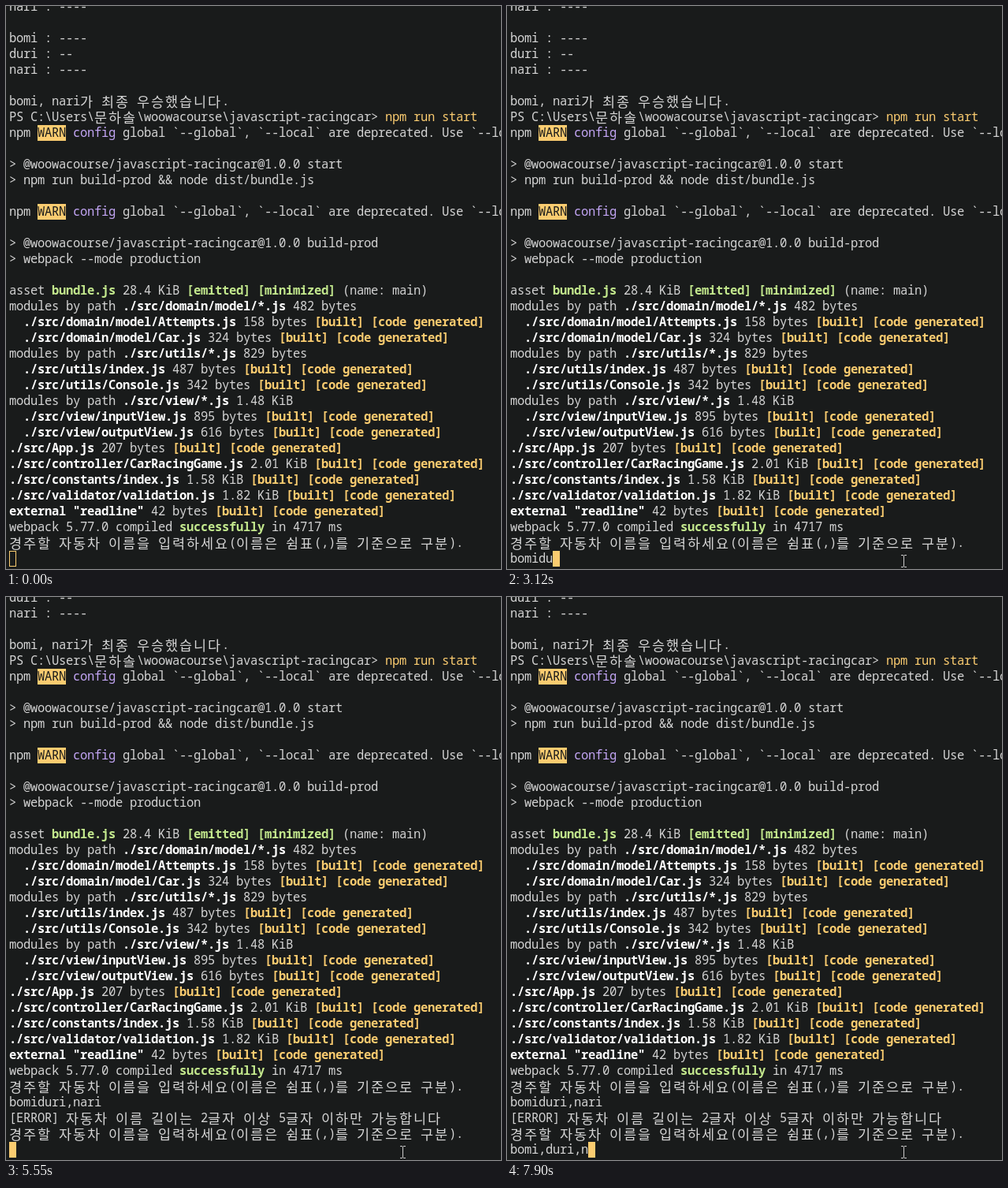
These frames come from a looping animation (628 px wide and 714 px high, 8000 ms). An HTML page with a canvas:

```html
<!DOCTYPE html>
<html lang="ko">
<head>
<meta charset="utf-8">
<title>Terminal</title>
<style>
html, body { margin: 0; width: 100%; height: 100%; overflow: hidden; background: #191b1b; }
canvas { display: block; }
</style>
</head>
<body>
<canvas id="stage" width="628" height="714"></canvas>
<script>
const ctx = document.getElementById('stage').getContext('2d');
const LOOP = 8000, CELL = 9, ROW = 20, LEFT = 4, TOP = -9, INPUT_ROW = 35;
const BG = '#191b1b', YELLOW = '#fbcc70';
const LATIN = '15.5px "Noto Sans Mono", "DejaVu Sans Mono", monospace';
const HANGUL = '300 17.5px "Noto Sans CJK KR", "Noto Sans CJK", sans-serif';

// Styles selected in the text with ^ and a letter
const styles = {
  d: { color: '#d4d4d4' },
  w: { color: '#ffffff', bold: true },
  g: { color: '#c3e88d', bold: true },
  y: { color: YELLOW, bold: true },
  n: { color: YELLOW },
  p: { color: '#c3a6f5' },
  x: { color: BG, back: YELLOW }
};

const [A, B, C] = ['bomi', 'duri', 'nari'];
const warn = 'npm ^xWARN^d ^pconfig^d global `--global`, `--local` are deprecated. Use `--location=global` instead.';
const built = '^y[built] [code generated]';
const file = (path, size) => `^w${path}^d ${size} ${built}`;
const group = (path, size) => `modules by path ^w${path}^d ${size}`;
const prompt = '경주할 자동차 이름을 입력하세요(이름은 쉼표(,)를 기준으로 구분).';

const log = [
  `${C} : ----`,
  '',
  `${A} : ----`,
  `${B} : --`,
  `${C} : ----`,
  '',
  `${A}, ${C}가 최종 우승했습니다.`,
  'PS C:\\Users\\문하솔\\woowacourse\\javascript-racingcar> ^nnpm run start',
  warn,
  '',
  '> @woowacourse/javascript-racingcar@1.0.0 start',
  '> npm run build-prod && node dist/bundle.js',
  '',
  warn,
  '',
  '> @woowacourse/javascript-racingcar@1.0.0 build-prod',
  '> webpack --mode production',
  '',
  'asset ^gbundle.js^d 28.4 KiB ^g[emitted] [minimized]^d (name: main)',
  group('./src/domain/model/*.js', '482 bytes'),
  file('  ./src/domain/model/Attempts.js', '158 bytes'),
  file('  ./src/domain/model/Car.js', '324 bytes'),
  group('./src/utils/*.js', '829 bytes'),
  file('  ./src/utils/index.js', '487 bytes'),
  file('  ./src/utils/Console.js', '342 bytes'),
  group('./src/view/*.js', '1.48 KiB'),
  file('  ./src/view/inputView.js', '895 bytes'),
  file('  ./src/view/outputView.js', '616 bytes'),
  file('./src/App.js', '207 bytes'),
  file('./src/controller/CarRacingGame.js', '2.01 KiB'),
  file('./src/constants/index.js', '1.58 KiB'),
  file('./src/validator/validation.js', '1.82 KiB'),
  file('external "readline"', '42 bytes'),
  'webpack 5.77.0 compiled ^gsuccessfully^d in 4717 ms',
  prompt
];

// Typing: [time, line, characters shown]
const typo = A + B + C, rejected = `${A + B},${C}`, retry = `${A},${B},${C}`;
const afterEnter = [...log, rejected, '[ERROR] 자동차 이름 길이는 2글자 이상 5글자 이하만 가능합니다', prompt].slice(3);
const ENTER = 5550, FOCUS = 1130, ERASE = [4430, 4500];
const keys = [
  [0, typo, 0], [2080, typo, 1], [2350, typo, 2], [2410, typo, 3], [2480, typo, 4],
  [2960, typo, 5], [3120, typo, 6], [3210, typo, 7], [3310, typo, 8],
  [3770, typo, 9], [3970, typo, 10], [4500, typo, 9], [4570, typo, 8],
  [4660, rejected, 9], [4760, rejected, 10], [4960, rejected, 12], [5420, rejected, 13],
  [ENTER, retry, 0], [6230, retry, 1], [6560, retry, 3], [6760, retry, 4],
  [6960, retry, 5], [7030, retry, 6], [7130, retry, 7], [7230, retry, 8],
  [7430, retry, 9], [7690, retry, 10], [7900, retry, 11]
];

// Mouse pointer: [time, x, y]
const moves = [
  [320, 525, 711], [380, 520, 709], [450, 515, 707], [510, 511, 705],
  [570, 508, 704], [640, 506, 703], [700, 505, 703],
  [1030, 511, 697], [1130, 507, 700], [1220, 503, 704]
];

const latest = (list, t) => list.filter(item => item[0] <= t).pop();

function drawLine(text, row) {
  const y = TOP + row * ROW;
  let x = LEFT, style = styles.d;
  for (let i = 0; i < text.length; i++) {
    if (text[i] === '^') {
      style = styles[text[++i]];
      continue;
    }
    const wide = text[i] >= '가' && text[i] <= '힣';
    const width = wide ? 2 * CELL : CELL;
    if (style.back) {
      ctx.fillStyle = style.back;
      ctx.fillRect(x, y, width, ROW);
    }
    ctx.font = wide ? HANGUL : (style.bold ? 'bold ' : '') + LATIN;
    ctx.fillStyle = style.color;
    ctx.fillText(text[i], x, y + (wide ? 17 : 15));
    x += width;
  }
}

function drawCursor(column, focused) {
  const x = LEFT + column * CELL, y = TOP + INPUT_ROW * ROW;
  ctx.fillStyle = ctx.strokeStyle = YELLOW;
  ctx.lineWidth = 1;
  if (focused) ctx.fillRect(x, y, CELL, ROW);
  else ctx.strokeRect(x + .5, y + .5, CELL - 1, ROW - 1);
}

function drawPointer(x, y) {
  ctx.fillStyle = '#cccccc';
  ctx.fillRect(x, y - 7, 1, 14);
  for (const edge of [y - 8, y + 7]) {
    ctx.fillRect(x - 3, edge, 3, 1);
    ctx.fillRect(x + 1, edge, 3, 1);
  }
}

let shown = '';

function draw(now) {
  requestAnimationFrame(draw);
  const t = now % LOOP;
  const [, line, count] = latest(keys, t);
  const move = latest(moves, t);
  const focused = t >= FOCUS;
  const visible = t < ERASE[0] || t >= ERASE[1];
  const entered = t >= ENTER;
  const state = [line, count, move, focused, visible, entered].join();
  if (state === shown) return;
  shown = state;

  ctx.fillStyle = BG;
  ctx.fillRect(0, 0, 628, 714);
  (entered ? afterEnter : log).forEach(drawLine);
  drawLine(line.slice(0, count), INPUT_ROW);
  if (visible) drawCursor(count, focused);
  if (move) drawPointer(move[1], move[2]);
}
requestAnimationFrame(draw);
</script>
</body>
</html>
```
